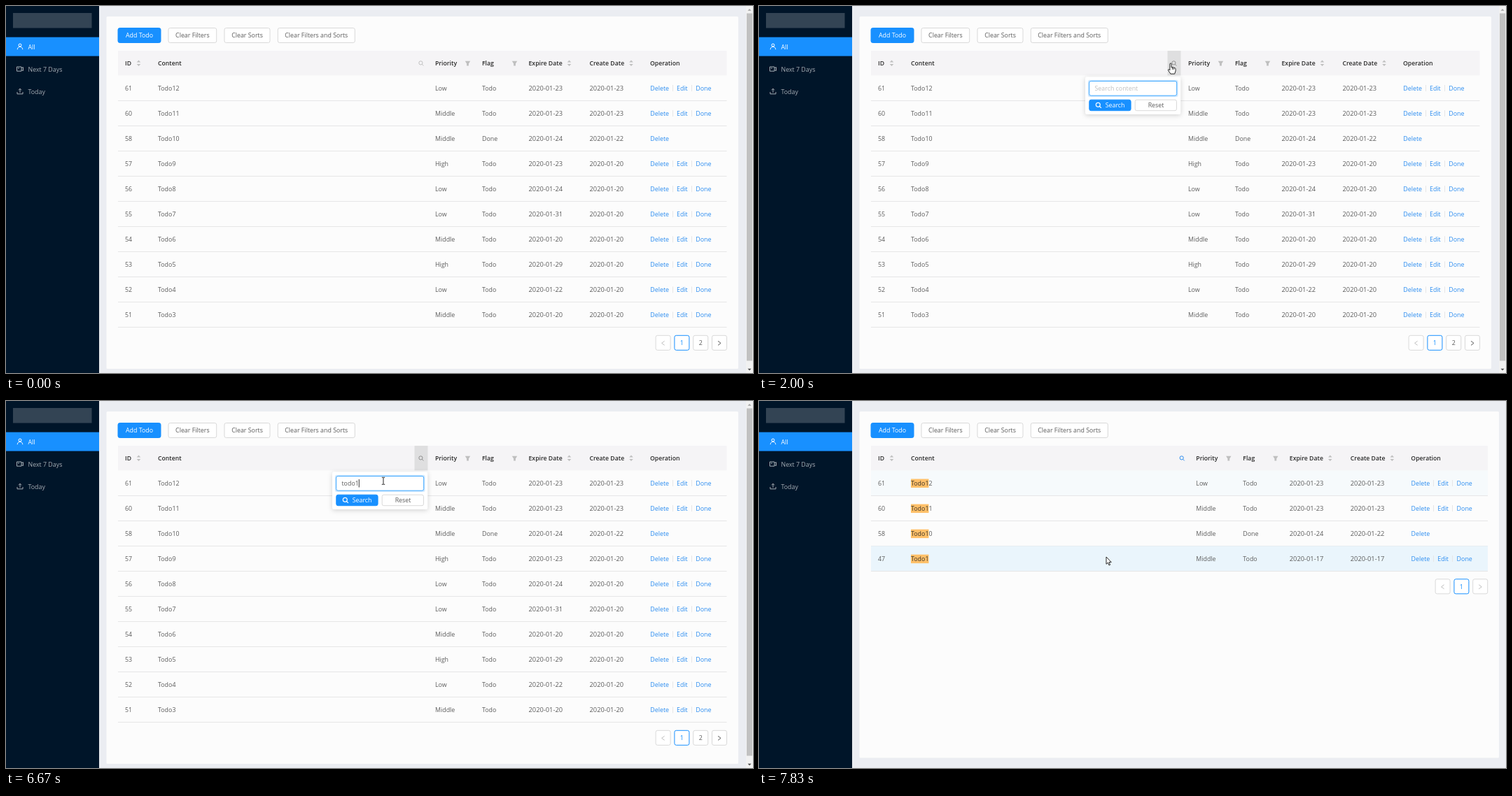
An HTML page with a canvas that plays this animation: 1067 by 525 pixels, repeating every 8000 ms.

```html
<!DOCTYPE html>
<html lang="en">
<head>
<meta charset="utf-8">
<title>Todo list</title>
<style>
html, body { margin: 0; width: 100%; height: 100%; overflow: hidden; background: #ebedf2; }
canvas { display: block; }
</style>
</head>
<body>
<canvas id="stage" width="1067" height="525"></canvas>
<script>
const ctx = document.getElementById('stage').getContext('2d');
const LOOP = 8000, FPS = 6, ROW = 36.05, TABLE_TOP = 99.3;
const BLUE = '#1890ff', LINK = '#2a8cf0', INK = '#5c5c5c', DARK = '#2b2b2b', PALE = '#bfbfbf', LINE = '#e6e6e7';
const FAMILY = '"Open Sans", "Noto Sans", sans-serif';
const BODY = '8.85px ' + FAMILY, HEAD = '600 8.7px ' + FAMILY, DATE = '9.3px ' + FAMILY;

// id, number, priority, flag, expire day, create day
const parse = list => list.split(' ').map(row => row.split(','));
const allRows = parse('61,12,Low,Todo,23,23 60,11,Middle,Todo,23,23 58,10,Middle,Done,24,22 57,9,High,Todo,23,20 ' +
  '56,8,Low,Todo,24,20 55,7,Low,Todo,31,20 54,6,Middle,Todo,20,20 53,5,High,Todo,29,20 52,4,Low,Todo,22,20 51,3,Middle,Todo,20,20');
const foundRows = [...allRows.slice(0, 3), ...parse('47,1,Middle,Todo,17,17')];

const OPEN = 1490, ENTER = 6800;
const typing = [[0, ''], [3660, 't'], [4160, 'to'], [4330, 'tof'], [4490, 'tofo'], [5330, 'tof'],
  [5490, 'to'], [5830, 'tod'], [5990, 'todo'], [6490, 'todo1']];
const pointerPath = [[600, 630, -25], [1250, 591, 80], [1900, 591, 80], [2600, 538.5, 114],
  [7550, 538.5, 114], [7800, 496, 223]];

const clamp = v => Math.max(0, Math.min(1, v));

function text(str, x, y, color = INK, font = BODY, align = 'left') {
  ctx.font = font;
  ctx.fillStyle = color;
  ctx.textAlign = align;
  ctx.fillText(str, x, y);
}

function rect(x, y, w, h, color) {
  ctx.fillStyle = color;
  ctx.fillRect(x, y, w, h);
}

function box(x, y, w, h, fill, border, radius = 2.5) {
  ctx.beginPath();
  ctx.roundRect(x, y, w, h, radius);
  ctx.fillStyle = fill;
  ctx.fill();
  if (border) {
    ctx.strokeStyle = border;
    ctx.lineWidth = 1;
    ctx.stroke();
  }
}

function shape(d, x, y, fill, stroke, width = 1) {
  const path = new Path2D(d);
  ctx.save();
  ctx.translate(x, y);
  ctx.lineJoin = 'round';
  if (fill) { ctx.fillStyle = fill; ctx.fill(path); }
  if (stroke) { ctx.strokeStyle = stroke; ctx.lineWidth = width; ctx.stroke(path); }
  ctx.restore();
}

function button(label, x, w, primary) {
  box(x, 31.5, w, 21, primary ? BLUE : '#fff', primary ? BLUE : '#d9d9d9');
  text(label, x + w / 2, 45.4, primary ? '#fff' : INK, BODY, 'center');
}

const magnifier = (x, y, color, scale = 1) => {
  ctx.save();
  ctx.translate(x, y);
  ctx.scale(scale, scale);
  shape('M2-.6A2.6 2.6 0 1 1-3.2-.6A2.6 2.6 0 1 1 2-.6M1.3 1.3L3.4 3.4', 0, 0, null, color, 1);
  ctx.restore();
};
const sorter = x => shape('M-2.8-1.4L0-4.4L2.8-1.4ZM-2.8 1L0 4L2.8 1Z', x, 82, PALE);
const funnel = x => shape('M-3.7-3.2H3.7L1.4.4V3.6H-1.4V.4Z', x, 82, PALE);

function sidebar() {
  rect(0, 0, 133, 525, '#001529');
  rect(10, 10, 112.5, 21.5, '#334454');
  rect(0, 44.6, 133, 27, BLUE);
  const muted = '#a6adb4';
  shape('M2-2A2 2 0 1 1-2-2A2 2 0 1 1 2-2M-3.8 4.2C-3.5-1 3.5-1 3.8 4.2', 20, 58, null, '#fff');
  shape('M-4.5-3H2V3.2H-4.5ZM2-1.3L4.5-2.3V2.5L2 1.5M-3-1H-1', 20, 90, null, muted);
  shape('M-4 1V3.8H4V1M0 1.8V-3.6M-2-1.6L0-3.8L2-1.6', 20, 122, null, muted);
  text('All', 31.5, 61.5, '#fff');
  text('Next 7 Days', 31.5, 93.5, muted);
  text('Today', 31.5, 125.5, muted);
}

function scrollbar() {
  rect(1057, 0, 10, 525, '#f1f1f1');
  rect(1058, 10.5, 8, 497, '#c1c1c1');
  shape('M-2.5 1.3L0-1.5L2.5 1.3Z', 1062, 5.5, '#a3a3a3');
  shape('M-2.5-1.3L0 1.5L2.5-1.3Z', 1062, 520, '#505050');
}

function pager(right, y, pages) {
  const count = pages + 2;
  for (let i = 0; i < count; i++) {
    const x = right - 21.3 - (count - 1 - i) * 26.8, active = i === 1;
    box(x, y, 21, 21, '#fff', active ? BLUE : '#d9d9d9');
    const cx = x + 10.5, cy = y + 10.5;
    if (i === 0) shape('M2-3L-2 0L2 3', cx, cy + .5, null, PALE);
    else if (i > pages) shape('M-2-3L2 0L-2 3', cx, cy + .5, null, pages > 1 ? INK : PALE);
    else text(i, cx, cy + 3.5, active ? BLUE : INK, BODY, 'center');
  }
}

function table(t, found, pointer, open) {
  const dx = found ? 11.3 : 0, right = found ? 1041 : 1029.5;
  rect(160, 64, right - 160, 35.3, '#f5f4f6');

  const searchX = 583.5 + dx;
  const overSearch = !found && inSearchCell(pointer);
  if (open || overSearch) rect(searchX, 64, 19, 35.3, '#dfdfe0');
  if (found) rect(searchX, 64, 19, 35.3, `rgba(200,200,200,${.3 * clamp(1 - (t - ENTER) / 500)})`);
  magnifier(593 + dx, 82, found ? LINK : open || overSearch ? '#8c8c8c' : PALE);

  text('ID', 170, 85, DARK, HEAD);
  text('Content', 217, 85, DARK, HEAD);
  [['Priority', 613], ['Flag', 680], ['Expire Date', 746.5], ['Create Date', 833.5], ['Operation', 920]]
    .forEach(([label, x]) => text(label, x + dx, 85, DARK, HEAD));
  sorter(189.5);
  sorter(804.5 + dx);
  sorter(893 + dx);
  funnel(659.5 + dx);
  funnel(726.5 + dx);

  const hovered = found ? Math.floor((pointer.y - TABLE_TOP) / ROW) : -1;
  (found ? foundRows : allRows).forEach(([id, number, priority, flag, expire, create], i) => {
    const top = TABLE_TOP + i * ROW, y = top + 21.7;
    const fading = found && i === 0 ? clamp(1 - (t - 7550) / 420) : 0;
    const tint = i === hovered ? 1 : fading;
    if (tint) rect(160, top, right - 160, ROW, `rgba(234,245,252,${tint})`);
    rect(160, Math.round(top + ROW - .4), right - 160, 1, LINE);
    text(id, 170, y);
    const name = 'Todo' + number;
    ctx.font = BODY;
    if (found) {
      const width = ctx.measureText('Todo1').width;
      rect(217, y - 9.5, width, 12.5, '#ffc069');
      text('Todo1', 217, y, '#3a3327');
      text(name.slice(5), 217 + width, y);
    } else text(name, 217, y);
    text(priority, 613 + dx, y);
    text(flag, 680 + dx, y);
    text('2020-01-' + expire, 746.5 + dx, y, INK, DATE);
    text('2020-01-' + create, 833.5 + dx, y, INK, DATE);
    text('Delete', 920.3 + dx, y, LINK);
    if (flag === 'Todo') {
      text('Edit', 958 + dx, y, LINK);
      text('Done', 985.3 + dx, y, LINK);
      rect(Math.round(952 + dx), y - 8, 1, 9, LINE);
      rect(Math.round(978.5 + dx), y - 8, 1, 9, LINE);
    }
  });
}

function searchPopup(t) {
  const grow = clamp((t - OPEN + 80) / 200);
  ctx.save();
  ctx.globalAlpha = grow;
  ctx.translate(0, 101);
  ctx.scale(1, .8 + .2 * grow);
  ctx.translate(0, -101);

  ctx.shadowColor = 'rgba(0,0,0,.17)';
  ctx.shadowBlur = 7;
  ctx.shadowOffsetY = 1.5;
  box(466, 101.3, 136.3, 53.7, '#fff');
  ctx.shadowColor = 'transparent';

  box(470, 105.8, 128.5, 24.2, 'rgba(24,144,255,.2)');
  box(471.7, 107.5, 125, 20.7, '#fff', '#40a9ff');
  const [since, value] = typing.findLast(([at]) => t >= at);
  text(value || 'Search content', 479.5, 121.3, value ? INK : PALE);
  if (value && t - since < 480) rect(479.5 + ctx.measureText(value).width, 112, 1, 11.5, '#333');

  box(471.8, 134.2, 59.3, 15.5, BLUE, BLUE);
  magnifier(485, 142, '#fff', 1.15);
  text('Search', 494.7, 145.2, '#fff');
  box(537.2, 134.2, 59.3, 15.5, '#fff', '#d9d9d9');
  text('Reset', 567, 145.2, INK, BODY, 'center');
  ctx.restore();
}

function pointerAt(t) {
  let [, x, y] = pointerPath[0];
  pointerPath.slice(1).forEach(([end, x1, y1], i) => {
    const [start, x0, y0] = pointerPath[i];
    if (t < start) return;
    const p = clamp((t - start) / (end - start)), e = p * p * (3 - 2 * p);
    x = x0 + (x1 - x0) * e;
    y = y0 + (y1 - y0) * e;
  });
  return { x, y };
}

function inSearchCell({ x, y }) {
  return x > 583 && x < 602 && y > 64 && y < 99;
}

function drawPointer(t, { x, y }, open, found) {
  if (t > 1250 && t < 1640) {
    ctx.beginPath();
    ctx.arc(591.5, 80, 8.3, 0, 7);
    ctx.fillStyle = `rgba(242,168,48,${.85 * clamp((1640 - t) / 200)})`;
    ctx.fill();
  }
  const overInput = open && x > 471 && x < 597 && y > 107 && y < 128;
  if (!found && inSearchCell({ x, y })) {
    shape('M-1.2 1.2C-1.2-.4 1-.4 1 1.2V6L2.6 5.6L4.3 6.2L6 6.7Q7 7 7 8.3V11L5.6 15.2H-.2L-3.4 10.4Q-4 8.6-2.6 8.8L-1.2 10ZM2.4 9V6M4.4 9V6.6',
      x, y, '#fff', '#111', .9);
  } else if (overInput) {
    shape('M-2.2-5H-.6L0-4.5L.6-5H2.2M0-4.5V4.5M-2.2 5H-.6L0 4.5L.6 5H2.2', x + .5, y + .3, null, '#222', 1);
  } else {
    shape('M0 0V10.3L2.4 8.2L4 12L5.6 11.3L4 7.6H7.2Z', x, y, '#fff', '#111', .9);
  }
}

function draw(t) {
  const found = t >= ENTER, open = t >= OPEN && !found, pointer = pointerAt(t);
  rect(0, 0, 1067, 525, '#ebedf2');
  box(143.5, 15, found ? 913.5 : 902.5, found ? 495.5 : 504, '#fcfcfc', null, 1.5);
  sidebar();
  if (!found) scrollbar();
  button('Add Todo', 160, 61, true);
  button('Clear Filters', 232, 68.7);
  button('Clear Sorts', 312, 65);
  button('Clear Filters and Sorts', 388.3, 110);
  table(t, found, pointer, open);
  if (found) pager(1041, 254.8, 1);
  else pager(1029.8, 471.3, 2);
  if (open) searchPopup(t);
  drawPointer(t, pointer, open, found);
}

const began = performance.now();
function tick() {
  const t = (performance.now() - began) % LOOP;
  draw(Math.floor((t + 4) * FPS / 1000) * 1000 / FPS);
  requestAnimationFrame(tick);
}
tick();
</script>
</body>
</html>
```
